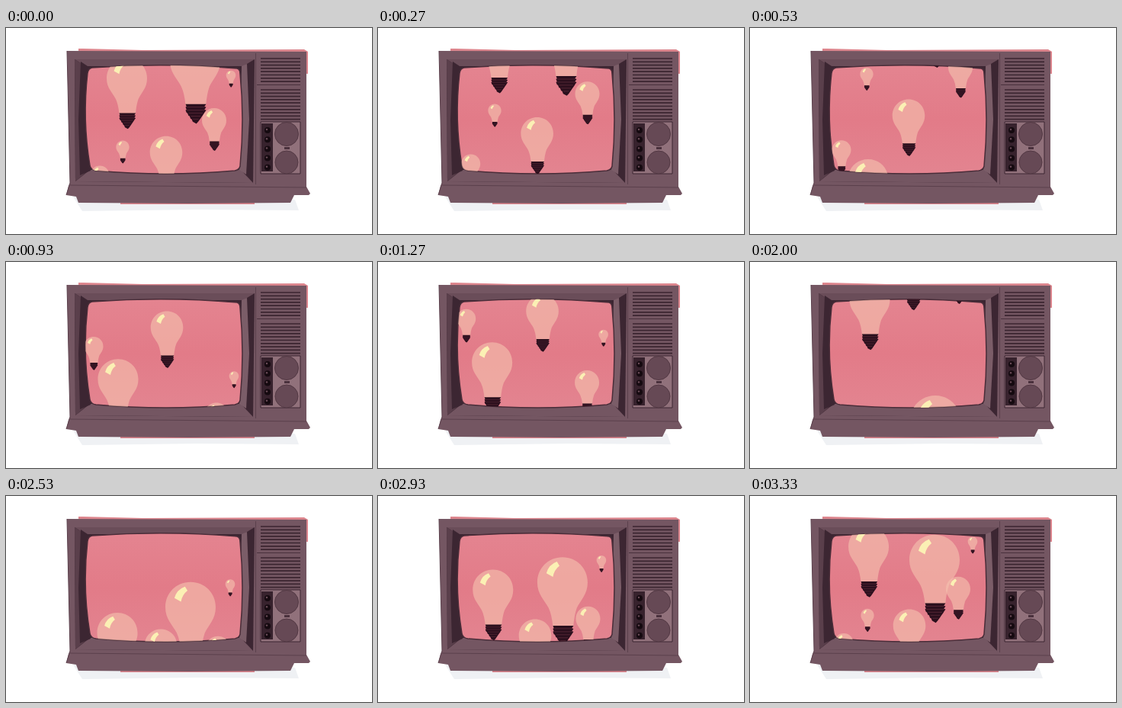
Recreate the animation shown at these times as an HTML page. Size 480 by 270 pixels, loop 3390 ms.

```html
<!DOCTYPE html>
<html lang="en">
<head>
<meta charset="utf-8">
<title>Bulbs on TV</title>
<style>
  html, body { margin: 0; width: 100%; height: 100%; overflow: hidden; background: #fff; }
  svg { display: block; width: 100%; height: 100%; }
</style>
</head>
<body>
<svg viewBox="0 0 480 270">
  <defs>
    <linearGradient id="glow" x1="0" y1="0" x2="0" y2="1">
      <stop offset="0" stop-color="#e48490"/>
      <stop offset=".5" stop-color="#e27b88"/>
      <stop offset="1" stop-color="#e38490"/>
    </linearGradient>
    <path id="screen" d="M113 52Q210 45 303 53Q307 54 307 60Q313 120 307 181Q306 186 300 187Q210 195 118 187Q111 186 110 180Q100 120 107 59Q108 53 113 52Z"/>
    <clipPath id="clip"><use href="#screen"/></clipPath>
    <g id="bulb">
      <path fill="#f5c2ae" fill-opacity=".62" d="M0-1C.57-1 1-.56 1 0C1 .48.72.7.57 1.02Q.47 1.3.43 1.76H-.38Q-.42 1.3-.55 1.02C-.71.7-1 .48-1 0C-1-.56-.57-1 0-1Z"/>
      <path fill="#fbf0b4" d="M-.64-.36Q-.55-.7-.22-.82L-.12-.66Q-.33-.5-.38-.22Z"/>
      <path id="cap" fill="#2b0f1d"/>
      <path id="thread" fill="none" stroke="#5a2a38" stroke-width=".025"/>
    </g>
  </defs>

  <path fill="#eff1f4" d="M88 221L100 240L250 238L384 239L379 225Z"/>
  <path fill="#dc858d" d="M95 27H101L180 29L391 28L396 31V60H95ZM150 222H326V231H150Z"/>
  <path fill="#745662" d="M80 30L394 31V208L399 217L397 219H378L373 229L240 230L95 229L92 221L79 219L82 207L84 203Z"/>
  <path fill="none" stroke="#5b404c" d="M80 30L84 203L79 219M327.5 33V205M84 206L394 209"/>

  <path fill="#3c2632" d="M90 41H326L324 203L91 201Z"/>
  <path fill="#6a4d59" d="M90 41H326L311 50H104Z"/>
  <path fill="#745662" d="M91 201L324 203L308 186H110Z"/>
  <path fill="#5a3f4b" d="M90 41L104 50L98 120L104 190L91 201Z"/>
  <path fill="#3c2632" d="M98 44L110 52L102 120L111 187L97 193L95 120Z"/>
  <path fill="#7b5d68" d="M309 50L316 47L319 120L315 192L306 186Z"/>
  <use href="#screen" fill="url(#glow)" stroke="#4a2d39" stroke-width="1.5"/>
  <g id="bulbs" clip-path="url(#clip)"></g>

  <path id="vents" fill="none" stroke="#3b2530" stroke-width="1.7"/>
  <path fill="none" stroke="#4a313d" d="M329 74.5H386"/>
  <path fill="#91717b" stroke="#3b2530" d="M334 123H386V191H334Z"/>
  <path fill="#37222d" d="M335 125H350V188H335Z"/>
  <g id="knobs"></g>
  <g fill="#664955" stroke="#533944"><circle cx="368" cy="139" r="15.5"/><circle cx="368" cy="176" r="15"/></g>
  <path fill="#4a313d" d="M365 156H372V159H365Z"/>
</svg>
<script>
const LOOP = 3390, STEP = 1000 / 15, SPEED = .175;
const $ = id => document.getElementById(id);
const add = (parent, tag, attrs) => {
  const el = parent.appendChild(document.createElementNS("http://www.w3.org/2000/svg", tag));
  for (const k in attrs) el.setAttribute(k, attrs[k]);
  return el;
};

// Screw cap: jagged rows that taper to a point
const left = [], right = [];
let grooves = "";
for (let i = 0; i < 6; i++) {
  const y = 1.72 + i * .12, w = Math.min(.41, .58 - i * .083);
  right.push([.03 + w, y], [w - .04, y + .1]);
  left.unshift([.07 - w, y + .1], [.03 - w, y]);
  if (i) grooves += `M${.08 - w} ${y}H${w - .03}`;
}
$("cap").setAttribute("d", "M" + [...right, [.05, 2.5], ...left].join("L") + "Z");
$("thread").setAttribute("d", grooves);

const slats = (y, n) => Array.from({ length: n }, (_, i) => `M334 ${y + i * 4.3}H386`).join("");
$("vents").setAttribute("d", slats(40, 8) + slats(81, 10));

for (let i = 0; i < 5; i++) {
  const y = 134 + i * 12.2;
  add($("knobs"), "circle", { cx: 343, cy: y, r: 4, fill: "#150a10" });
  add($("knobs"), "circle", { cx: 342, cy: y - 1, r: 1.2, fill: "#6b4c58" });
}

const bulbs = [];
// Bulbs of one radius; each path lists [time, x, y] of the centre
function float(r, ...paths) {
  for (const path of paths) bulbs.push({ r, path, el: add($("bulbs"), "use", { href: "#bulb" }) });
}
float(26.5,
  [[0, 158.5, 66]],
  [[530, 155, 199], [930, 147, 154], [1530, 153, 112], [2000, 157, 49]],
  [[2530, 146, 180], [3330, 155.5, 67]]);
float(33,
  [[0, 248, 43], [530, 244, -30]],
  [[2000, 243, 208], [2530, 242, 146], [3330, 242, 84]]);
float(21.3,
  [[0, 210, 163], [530, 208, 115], [930, 211, 86], [1530, 218, 47], [2000, 214, 10]],
  [[2530, 203, 196], [3330, 209, 170]]);
float(16,
  [[0, 273, 121], [530, 276, 52]],
  [[930, 276, 201], [1530, 273, 119], [2000, 274, 15]],
  [[2530, 278, 200], [3330, 273, 122]]);
float(12.5,
  [[0, 123, 193], [530, 120, 160], [930, 115, 111], [1530, 117, 46]],
  [[3330, 123, 193]]);
float(8.6, [[0, 153, 156], [530, 153, 61]], [[3330, 154, 157]]);
float(6.3,
  [[0, 295, 62]],
  [[930, 299, 150], [1530, 293, 52]],
  [[2020, 296, 199], [2530, 294, 116], [3330, 292, 60]]);

function slope(p, i, k) {
  if (p.length < 2) return k === 2 ? -SPEED : 0;
  const a = p[Math.max(i - 1, 0)], b = p[Math.min(i + 1, p.length - 1)];
  return (b[k] - a[k]) / (b[0] - a[0]);
}

// Smooth curve through a path, carried on straight past both ends
function at(p, t, k) {
  const last = p.length - 1;
  if (t <= p[0][0]) return p[0][k] + (t - p[0][0]) * slope(p, 0, k);
  if (t >= p[last][0]) return p[last][k] + (t - p[last][0]) * slope(p, last, k);
  const i = p.findIndex(q => q[0] > t) - 1;
  const a = p[i], b = p[i + 1], d = b[0] - a[0], u = (t - a[0]) / d, v = 1 - u;
  return v * v * (1 + 2 * u) * a[k] + u * u * (3 - 2 * u) * b[k]
    + d * u * v * (v * slope(p, i, k) - u * slope(p, i + 1, k));
}

function draw(now) {
  const t = Math.floor((now % LOOP + 4) / STEP) * STEP;
  for (const { r, path, el } of bulbs)
    el.setAttribute("transform", `translate(${at(path, t, 1)} ${at(path, t, 2)}) scale(${r})`);
}

const start = performance.now();
function tick() {
  draw(performance.now() - start);
  requestAnimationFrame(tick);
}
tick();
</script>
</body>
</html>
```
